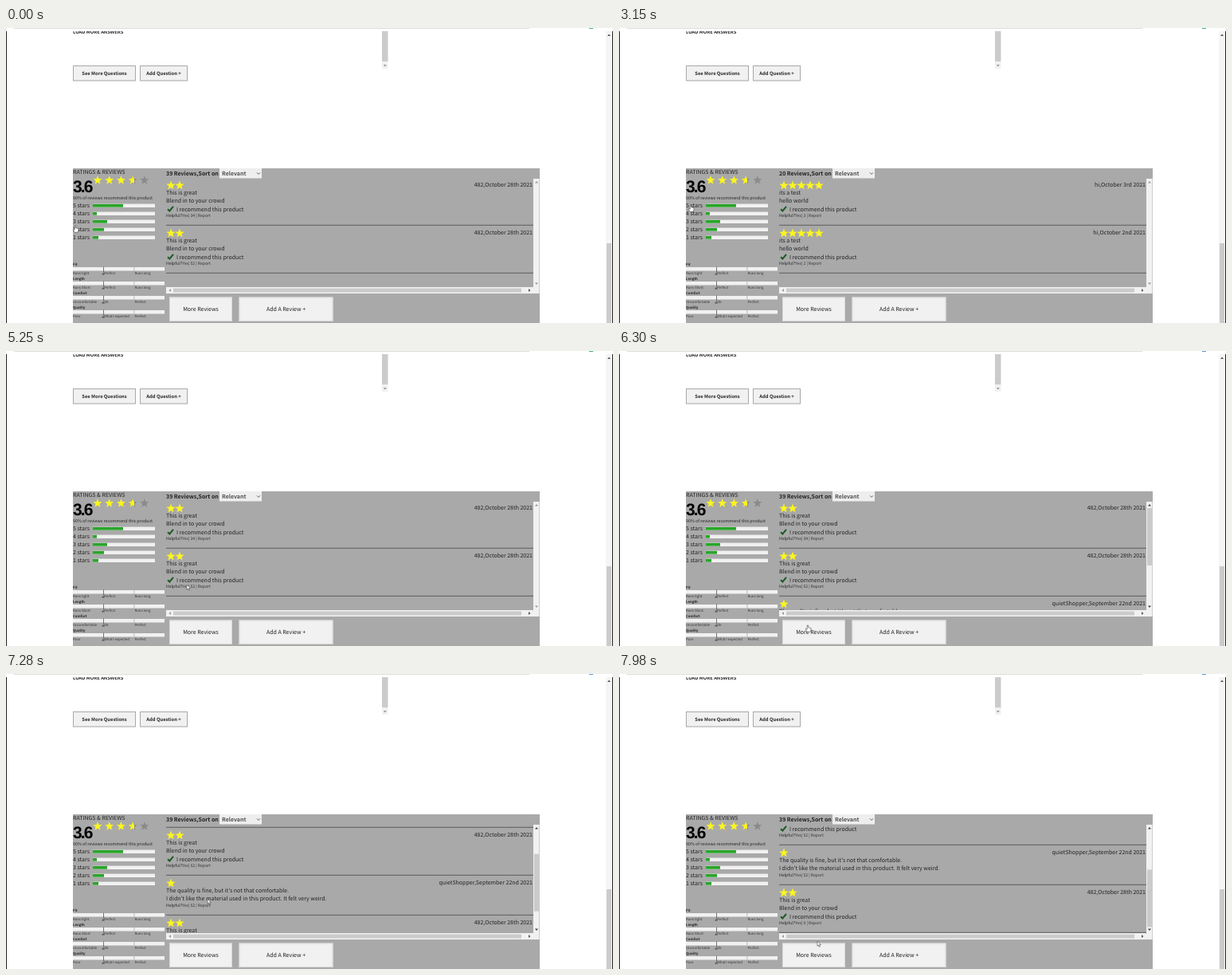
Write an HTML page with a canvas that moves like this. It is 762 by 370 pixels and loops after 8 s.

```html
<!DOCTYPE html>
<html lang="en">
<head>
<meta charset="utf-8">
<title>Ratings and reviews</title>
<style>
html, body { margin: 0; width: 100%; height: 100%; overflow: hidden; background: #fff; }
canvas { display: block; }
</style>
</head>
<body>
<canvas id="stage" width="762" height="370"></canvas>
<script>
const ctx = document.getElementById('stage').getContext('2d');
const LOOP = 8000, TICK = 70;
const SANS = '"Noto Sans CJK JP", "Noto Sans CJK SC", "Noto Sans CJK", "Open Sans", sans-serif';
const YELLOW = '#fbf51f', LIGHT = '#f1f1f1', THUMB = '#cbcbcb';

const great = votes => ({ stars: 2, by: '482,October 28th 2021',
  lines: ['This is great', 'Blend in to your crowd'], check: true, votes });
const hello = (day, votes) => ({ stars: 5, by: `hi,October ${day} 2021`,
  lines: ['its a test', 'hello world'], check: true, votes });
const quality = { stars: 1, by: 'quietShopper,September 22nd 2021',
  lines: ["The quality is fine, but it's not that comfortable.",
    "I didn't like the material used in this product. It felt very weird."], votes: 52 };
const relevant = [great(34), great(52), quality, great(9)];
const fiveStar = [hello('3rd', 3), hello('2nd', 2)];

// Each move: start, end, then the values reached at the end
const cursorMoves = [
  [0, 0, 87, 248], [70, 350, 87, 227], [490, 700, 90, 222],
  [4410, 4690, 227, 257], [5040, 5250, 227, 293], [5320, 5810, 237, 344],
  [6580, 6790, 253, 282], [7840, 7980, 249, 335]];
const scrollMoves = [[0, 0, 0], [7070, 7280, 55], [7490, 7560, 93]];

function follow(moves, t) {
  let [, , ...value] = moves[0];
  for (const [start, end, ...target] of moves.slice(1)) {
    if (t < start) break;
    const p = Math.min(1, (t - start + TICK) / (end - start + TICK));
    value = value.map((v, i) => v + (target[i] - v) * p);
  }
  return value;
}

function rect(x, y, w, h, fill) {
  ctx.fillStyle = fill;
  ctx.fillRect(x, y, w, h);
}

function text(str, x, midY, size = 7, { weight = 400, align = 'left', color = '#222' } = {}) {
  ctx.font = `${weight} ${size}px ${SANS}`;
  ctx.textAlign = align;
  ctx.fillStyle = color;
  ctx.fillText(str, x, midY + size * 0.33);
}

function trace(points, close) {
  ctx.beginPath();
  for (let i = 0; i < points.length; i += 2) ctx.lineTo(points[i], points[i + 1]);
  if (close) ctx.closePath();
}

function stroke(points, color, width) {
  trace(points);
  ctx.strokeStyle = color;
  ctx.lineWidth = width;
  ctx.stroke();
}

function star(x, y, r, fill) {
  const points = [];
  for (let i = 0; i < 10; i++) {
    const a = i * Math.PI / 5, d = i % 2 ? r * 0.43 : r;
    points.push(x + d * Math.sin(a), y - d * Math.cos(a));
  }
  trace(points, true);
  ctx.fillStyle = fill;
  ctx.fill();
}

function arrow(x, y, dx, dy, color = '#555') {
  trace([x + dx * 1.5, y + dy * 1.5, x - dx + dy * 2, y - dy + dx * 2,
    x - dx - dy * 2, y - dy - dx * 2], true);
  ctx.fillStyle = color;
  ctx.fill();
}

function button(label, x, y, w, h, size, weight, border) {
  rect(x, y, w, h, '#f1f1f1');
  ctx.strokeStyle = border;
  ctx.lineWidth = 1;
  ctx.strokeRect(x + 0.5, y + 0.5, w - 1, h - 1);
  text(label, x + w / 2, y + h / 2 + 0.4, size, { weight, align: 'center' });
}

function drawPage(t) {
  rect(0, 0, 762, 370, '#fff');
  text('LOAD MORE ANSWERS', 84, 4.7, 5.83, { weight: 700 });
  rect(0, 0, 762, 4, '#fff');
  rect(10, 0, 647, 1, '#dedede');
  rect(732, 0, 5, 1, t < 6160 ? '#35b58a' : '#5b9bd5');

  rect(472, 4, 7.5, 38, THUMB);
  rect(472, 42, 7.5, 9, LIGHT);
  arrow(475.8, 47, 0, 1, '#999');

  rect(753, 4, 8, 366, '#f5f5f5');
  rect(754, 270, 6, 100, THUMB);
  arrow(757, 9, 0, -1);
  rect(0, 4, 1, 366, '#222');
  rect(761, 4, 1, 366, '#222');

  button('See More Questions', 84, 47, 79, 19.5, 5.83, 700, '#a8a8a8');
  button('Add Question +', 168, 47, 60, 19.5, 5.83, 700, '#a8a8a8');
  rect(84, 176, 586, 194, '#a9a9a9');
}

function drawSummary() {
  text('RATINGS & REVIEWS', 84, 181);
  ctx.font = '700 21px "Liberation Sans", sans-serif';
  ctx.letterSpacing = '-1.9px';
  ctx.textAlign = 'left';
  ctx.fillStyle = '#000';
  ctx.fillText('3.6', 84, 205.5);
  ctx.letterSpacing = '0px';

  for (let i = 0; i < 5; i++) {
    const x = 115 + i * 14.7;
    star(x, 191, 5.8, i < 3 ? YELLOW : '#8a8a8a');
    if (i === 3) {
      ctx.save();
      ctx.beginPath();
      ctx.rect(x - 6, 184, 8, 14);
      ctx.clip();
      star(x, 191, 5.8, YELLOW);
      ctx.restore();
    }
  }
  text('90% of reviews recommend this product', 84, 213.5, 5.35);

  [38, 5, 18, 14, 7].forEach((width, i) => {
    const y = 222.6 + i * 10;
    text(`${5 - i} stars`, 84, y);
    rect(109, y - 2, 78, 4.4, LIGHT);
    rect(109, y - 1.7, width, 3.8, '#2aa52a');
  });

  [['Fit', 'Runs tight', 'Perfect', 'Runs long'],
   ['Length', 'Runs Short', 'Perfect', 'Runs long'],
   ['Comfort', 'Uncomfortable', 'Ok', 'Perfect'],
   ['Quality', 'Poor', 'What I expected', 'Perfect']].forEach(([title, ...labels], i) => {
    const y = 297 + i * 18;
    text(title, 84, y, 4.3, { weight: 700 });
    rect(84, y + 3, 115, 4.5, LIGHT);
    rect(122, y + 2.5, 0.8, 7, '#555');
    rect(160.5, y + 3, 0.8, 4.5, '#a9a9a9');
    arrow(122, y + 11.5, 0, -1, '#555');
    labels.forEach((label, k) => text(label, [84, 123, 161.5][k], y + 11, 4.3, { color: '#333' }));
  });
}

function drawReview(review, y) {
  for (let i = 0; i < review.stars; i++) star(207 + i * 11, y, 6, YELLOW);
  text(review.by, 661, y - 0.5, 7, { align: 'right' });
  review.lines.forEach((line, i) => text(line, 201, y + 9.3 + i * 10));
  let foot = y + 28;
  if (review.check) {
    stroke([203, y + 29.7, 205.4, y + 32, 210, y + 26.3], '#1d5a28', 2);
    text('I recommend this product', 214, y + 29.8);
    foot += 10;
  }
  text('Helpful?', 201, foot, 5.2);
  text(`Yes| ${review.votes} | Report`, 221.3, foot, 5.1, { color: '#333' });
  rect(201, foot + 11.3, 461, 1, '#5c5c5c');
  return foot + 22;
}

function drawReviews(t) {
  const filtered = t >= 1470 && t < 4060;
  const expanded = t >= 6300;
  const [scroll] = follow(scrollMoves, t);
  const list = filtered ? fiveStar : relevant.slice(0, expanded ? 4 : 2);

  text(`${filtered ? 20 : 39} Reviews,Sort on`, 201, 182.7, 7, { weight: 700 });
  rect(268, 176, 53, 12.5, '#eee');
  text('Relevant', 271, 182.5, 7, { weight: 700, color: '#505050' });
  stroke([315, 181.4, 317, 183.4, 319, 181.4], '#505050', 0.9);

  ctx.save();
  ctx.beginPath();
  ctx.rect(201, 189, 461, 136);
  ctx.clip();
  let y = 197.5 - scroll;
  for (const review of list) y = drawReview(review, y);
  ctx.restore();

  rect(662, 189, 7.5, 144, LIGHT);
  rect(201, 325, 461, 8, LIGHT);
  if (expanded) rect(663, 197 + scroll * 0.52, 6, 72, THUMB);
  rect(210, 326.5, 437, 5, THUMB);
  arrow(666, 193.5, 0, -1, expanded ? '#444' : '#999');
  arrow(666, 320.5, 0, 1, expanded ? '#444' : '#999');
  arrow(206, 329, -1, 0, '#999');
  arrow(657, 329, 1, 0);

  button('More Reviews', 205, 337.5, 79, 30.5, 7, 400, '#d8d8d8');
  button('Add A Review +', 292.5, 337.5, 118, 30.5, 7, 400, '#d8d8d8');
}

function drawCursor(t) {
  const [x, y] = follow(cursorMoves, t);
  const overLink = x < 110 || y > 338;
  const shape = overLink
    ? [-0.8, 0, 0.6, 0, 0.7, 2.8, 4, 3.6, 4, 6, 3, 8.3, -0.8, 8.3, -3, 5, -2.4, 4.2, -0.8, 5.2]
    : [0, 0, 0, 6.2, 1.4, 5, 2.4, 7.2, 3.4, 6.8, 2.5, 4.7, 4.4, 4.6];
  trace(shape.map((v, i) => v + (i % 2 ? y : x)), true);
  ctx.fillStyle = '#fff';
  ctx.fill();
  ctx.strokeStyle = '#444';
  ctx.lineWidth = 0.6;
  ctx.stroke();
}

function render() {
  const t = Math.floor((performance.now() % LOOP) / TICK) * TICK;
  ctx.textRendering = 'geometricPrecision';
  drawPage(t);
  drawSummary();
  drawReviews(t);
  drawCursor(t);
  requestAnimationFrame(render);
}
render();
</script>
</body>
</html>
```
